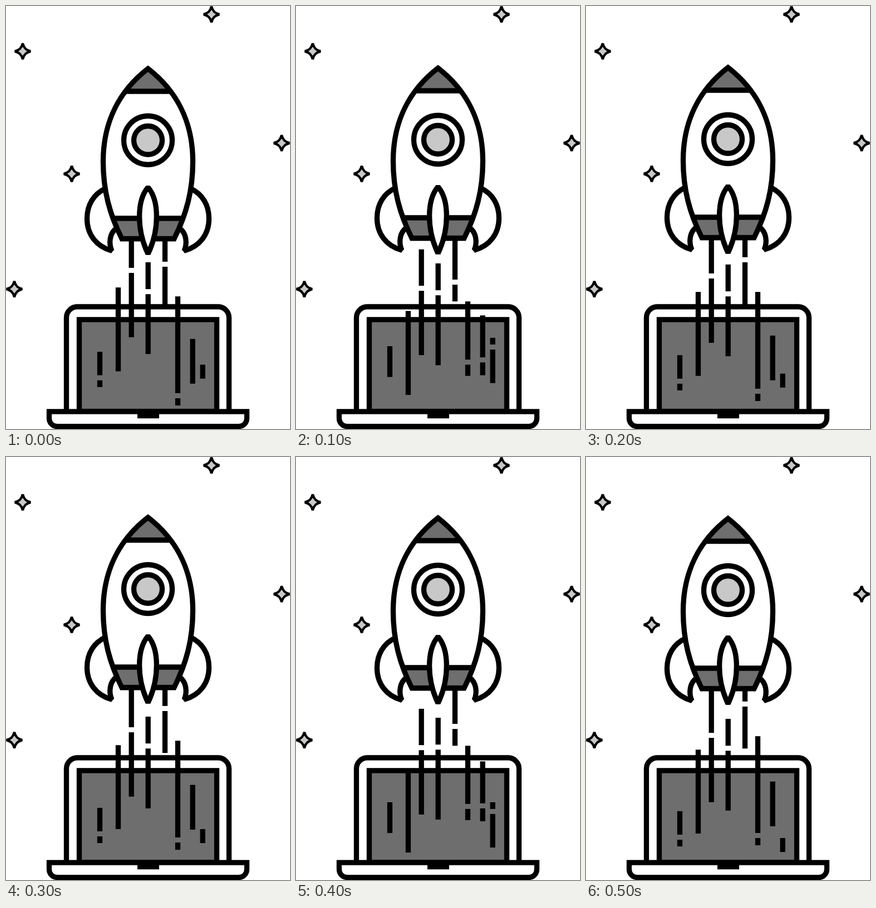
An HTML page that plays this animation: 510 px wide and 756 px high, repeating every 0.6 s.

```html
<!DOCTYPE html>
<html lang="en">
<head>
<meta charset="utf-8">
<title>Rocket launch</title>
<style>
  html, body { margin: 0; width: 100%; height: 100%; overflow: hidden; background: #fff; }
  svg { display: block; width: 100%; height: 100%; }
  .ink { fill: #fff; stroke: #000; stroke-width: 9.3; }
  .bevel { stroke-linejoin: bevel; }
  .dark { fill: #6e6e6e; }
  .light { fill: #c8c8c8; }
  .line { fill: none; }
</style>
</head>
<body>
<svg viewBox="0 0 510 756">
  <defs>
    <path id="star" class="ink light bevel" style="stroke-width:4.4"
      d="M0-14.2C2-6 6-2 14.2 0C6 2 2 6 0 14.2C-2 6-6 2-14.2 0C-6-2-2-6 0-14.2Z"/>
    <path id="fin" class="ink bevel"
      d="M179 326C157 336 145.500 356 145.500 380C145.500 408 162 430 190 437.500C184 424 186 405 199 397"/>
    <path id="hull"
      d="M255 112C203 152 174.500 208 174.500 278C174.500 330 186 372 208 416H302C324 372 335.500 330 335.500 278C335.500 208 307 152 255 112Z"/>
    <clipPath id="inside"><use href="#hull"/></clipPath>
  </defs>

  <g id="stars"></g>

  <g id="laptop">
    <path class="ink" d="M108.500 724V557A19.500 19.500 0 0 1 128 537.500H381A19.500 19.500 0 0 1 400.500 557V724"/>
    <rect class="ink dark" x="131.500" y="560.500" width="247" height="164"/>
    <path class="ink" d="M77.500 724.800H432.500V737A14.500 14.500 0 0 1 418 751.500H92A14.500 14.500 0 0 1 77.500 737Z"/>
    <rect x="236" y="725" width="39" height="12"/>
  </g>

  <path id="trails" class="ink line"/>

  <g id="rocket">
    <use href="#fin"/>
    <use href="#fin" transform="matrix(-1 0 0 1 510 0)"/>
    <use href="#hull" fill="#fff"/>
    <g clip-path="url(#inside)">
      <path class="ink dark" d="M160 152.500V90H350V152.500Z"/>
      <path class="ink dark" d="M160 379.500V430H350V379.500Z"/>
    </g>
    <use href="#hull" class="ink line"/>
    <circle class="ink" cx="255" cy="240" r="43.500"/>
    <circle class="ink light" cx="255" cy="240" r="25.500"/>
    <path class="ink bevel" d="M255 324C234.500 348 234.500 400 255 443C275.500 400 275.500 348 255 324Z"/>
  </g>
</svg>
<script>
const STEP = 100;
const GAP = 9;
const lift = [0, 1, 2, 4, 3, 2];

// Each streak drifts a little per step and flares on every third one.
// A pose is a start, then dash lengths.
const streaks = [
  { x: 168.5, drift: 3, rest: [618, 42, 12], flare: [605, 55] },
  { x: 201.5, drift: 4, rest: [503, 150], flare: [541, 150] },
  { x: 225.2, drift: 5, rest: [350, 118, 115], flare: [430, 65, 115] },
  { x: 255.2, drift: 2, rest: [458, 48, 107], flare: [458, 48, 125] },
  { x: 285.5, drift: -4, rest: [350, 107, 75], flare: [350, 143, 30] },
  { x: 308.5, drift: -4, rest: [519, 173, 13], flare: [532, 104, 20] },
  { x: 335.2, drift: -3, rest: [595, 80], flare: [556, 75, 23] },
  { x: 353.2, drift: 8, rest: [641, 25], flare: [585, 12, 60] }
];

function dashes({ x, drift, rest, flare }, i) {
  const [start, ...lengths] = i % 3 === 1 ? flare : rest;
  let y = start + drift * i;
  return lengths.map(len => {
    const dash = `M${x} ${y}v${len}`;
    y += len + GAP;
    return dash;
  }).join('');
}

const $ = id => document.getElementById(id);
$('stars').innerHTML = [[30, 81], [369, 15], [495, 245], [118, 300], [15, 506]]
  .map(([x, y]) => `<use href="#star" x="${x}" y="${y}"/>`).join('');

const begin = performance.now();

function draw(now) {
  const i = Math.floor(Math.max(0, now - begin) / STEP) % lift.length;
  $('trails').setAttribute('d', streaks.map(s => dashes(s, i)).join(''));
  $('rocket').setAttribute('transform', `translate(0 ${-lift[i]})`);
  requestAnimationFrame(draw);
}
draw(begin);
</script>
</body>
</html>
```
